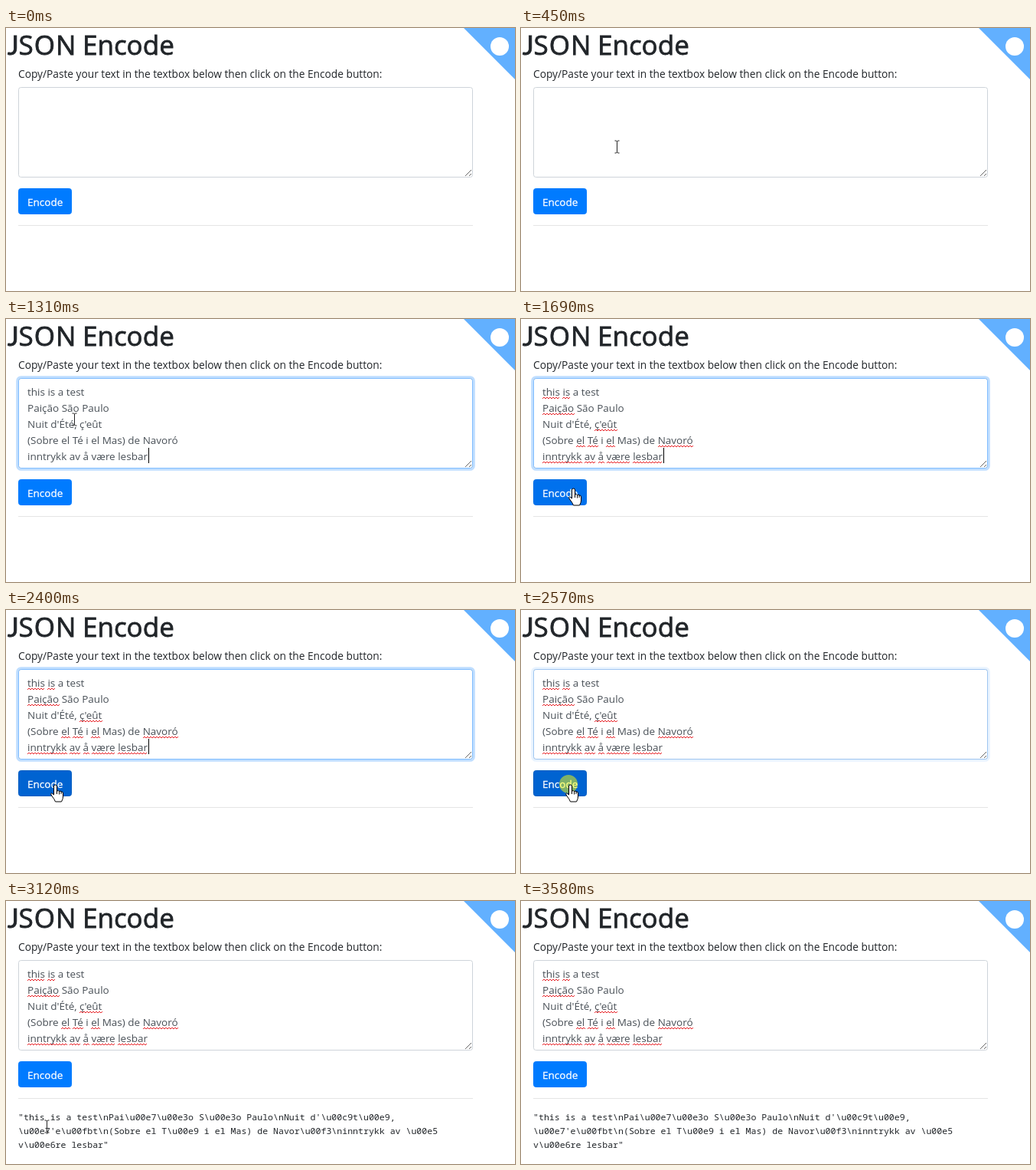
These frames come from a looping animation (665 px wide and 343 px high, 4300 ms). An HTML page:

```html
<!DOCTYPE html>
<html lang="en">
<head>
<meta charset="utf-8">
<title>JSON Encode</title>
<style>
  html, body { margin: 0; width: 100%; height: 100%; overflow: hidden; background: #fff; }
  svg { display: block; font: 13.5px "Open Sans", "Noto Sans", sans-serif; fill: #212529; }
  .title { font-size: 35px; stroke: #212529; stroke-width: .8; }
  .intro { font-size: 13.73px; }
  .input { fill: #495057; }
  .label { fill: #fff; stroke: #fff; stroke-width: .3; }
  .output { font: 11.57px "Noto Sans Mono", "DejaVu Sans Mono", monospace; }
  .line { fill: none; }
  .cursor { fill: #fff; stroke: #000; stroke-linejoin: round; }
</style>
</head>
<body>
<svg width="665" height="343" viewBox="0 0 665 343">
  <text class="title" y="35"><tspan x="2" font-family="Lato, sans-serif">J</tspan><tspan x="16.5" letter-spacing="1">SON</tspan> <tspan x="100">Encode</tspan></text>
  <path d="M598 0H665V67Z" fill="#62b0ff"/>
  <circle cx="645" cy="24" r="12" fill="#fff"/>
  <text class="intro" x="16" y="65">Copy/Paste your text in the textbox below then click on the Encode button:</text>

  <rect id="ring" class="line" x="14.6" y="75.6" width="596.8" height="120.8" rx="5" stroke="#007bff" stroke-width="2.8"/>
  <rect class="line" x="16.5" y="77.5" width="593" height="117" rx="3" stroke="#ced4da"/>
  <rect id="border" class="line" x="16.5" y="77.5" width="593" height="117" rx="3" stroke="#80bdff"/>
  <path class="line" d="M600 193L608 185M605 193L608 190" stroke="#666"/>
  <g id="input" class="input"></g>
  <path id="squiggles" class="line" stroke="#e8262b"/>
  <rect id="caret" width="1" height="20" fill="#000"/>

  <rect id="button" x="16.5" y="209.5" width="69" height="33" rx="3"/>
  <text class="label" x="28" y="232">Encode</text>
  <path d="M16 257.5H610" stroke="#e5e5e5"/>
  <g id="output" class="output"></g>

  <circle id="glow" r="12" fill="#ff0" fill-opacity=".5"/>
  <g id="pointer">
    <path id="beam" class="line" stroke="#222" d="M-3-8h2l1 1 1-1h2M0-7V7M-3 8h2l1-1 1 1h2"/>
    <path id="arrow" class="cursor" d="M0 0V16l4-4 3 6 2-1-3-6h5z"/>
    <path id="hand" class="cursor" d="M-2 2a2 2 0 0 1 4 0v6q2-1 3 .5 2-1 2.5.5 2.5-.5 2.5 2v5q0 2-2 6h-8q-1-3-5-8-2-3 0-3 1 0 3 2zM2 8v4M5 8.5v4M7.5 9v3"/>
  </g>
</svg>
<script>
const LOOP = 4300;
const $ = id => document.getElementById(id);
const show = (id, on) => $(id).style.display = on ? "" : "none";

// An underscore marks a word the spell checker underlines.
const marked = [
  "_this _is a test",
  "_Paição São Paulo",
  "Nuit d'Été, _ç'eût",
  "(Sobre _el _Té i _el Mas) de _Navoró",
  "_inntrykk _av _å _være _lesbar"
];
const lines = marked.map(s => s.replaceAll("_", ""));

function addText(parent, text, x, y) {
  const node = document.createElementNS("http://www.w3.org/2000/svg", "text");
  node.setAttribute("x", x);
  node.setAttribute("y", y);
  node.textContent = text;
  $(parent).append(node);
  return node;
}

function wave(x, end, y) {
  let d = `M${x} ${y + 2}`;
  for (let i = 1; x + 2 * i <= end + 1; i++) d += `L${x + 2 * i} ${y + (i % 2 ? 0 : 2)}`;
  return d;
}

let squiggles = "";
lines.forEach((line, row) => {
  const y = 100 + 21 * row;
  const node = addText("input", line, 28, y);
  let pos = 0;
  for (const word of marked[row].split(" ")) {
    const text = word.replace("_", "");
    if (text !== word) {
      const x = node.getStartPositionOfChar(pos).x;
      const end = node.getEndPositionOfChar(pos + text.length - 1).x;
      squiggles += wave(Math.round(x), end, y + 2);
    }
    pos += text.length + 1;
  }
});
$("squiggles").setAttribute("d", squiggles);

const encoded = JSON.stringify(lines.join("\n")).replace(/[^\0-\x7f]/g,
  c => "\\u" + c.charCodeAt(0).toString(16).padStart(4, "0"));
encoded.match(/.{1,85}(?: |$)/g).forEach((s, i) => addText("output", s.trim(), 16, 286 + 18 * i));

// Step tracks: [start time, ...values]
const pointer = [
  [0], [220, "arrow", 391, 289], [300, "arrow", 300, 238], [370, "beam", 204, 188],
  [450, "beam", 125, 155], [600, "beam", 104, 139], [670, "beam", 94, 131],
  [740, "beam", 90, 129], [920, "beam", 89, 131], [1380, "beam", 87, 143],
  [1450, "beam", 83, 166], [1520, "arrow", 78, 196], [1600, "hand", 73, 213],
  [1690, "hand", 68, 221], [1780, "hand", 64, 228], [2950, "hand", 62, 234],
  [3030, "arrow", 58, 262], [3120, "beam", 53, 294], [3270, "beam", 82, 290],
  [3340, "beam", 109, 287], [3510, "beam", 140, 299], [3580]
];
const focus = [[0, 0], [830, .4], [920, 1], [2570, .6], [2640, .2], [2710, 0]];
const hover = [[0, 0], [1600, .1], [1690, .4], [1780, 1], [2950, .8], [3030, .3], [3120, 0]];

const at = (track, t) => track.findLast(step => step[0] <= t).slice(1);
const within = (t, a, b) => t >= a && t < b;
const mix = (a, b, k) => Math.round(a + (b - a) * k);
const blue = (g, b, k) => `rgb(0,${mix(123, g, k)},${mix(255, b, k)})`;

function draw(t) {
  const pasted = t >= 1310;
  const [f] = at(focus, t), [h] = at(hover, t);
  $("border").style.opacity = f;
  $("ring").style.opacity = f * f / 4;
  $("button").style.fill = blue(99, 209, h);
  $("button").style.stroke = blue(92, 191, h);

  show("input", pasted);
  show("squiggles", t >= 1450);
  show("output", t >= 2710);
  show("caret", within(t, 830, 1850) || within(t, 2400, 2570));
  $("caret").setAttribute("x", pasted ? 186 : 28);
  $("caret").setAttribute("y", pasted ? 168 : 84);

  const [shape, x = 0, y = 0] = at(pointer, t);
  for (const id of ["beam", "arrow", "hand"]) show(id, id === shape);
  $("pointer").setAttribute("transform", `translate(${x + .5} ${y})`);
  $("glow").setAttribute("transform", `translate(${x - 2} ${y - 1})`);
  show("glow", within(t, 830, 920) || within(t, 2570, 2790));
}

const start = performance.now();
function tick() {
  draw((performance.now() - start) % LOOP);
  requestAnimationFrame(tick);
}
tick();
</script>
</body>
</html>
```
